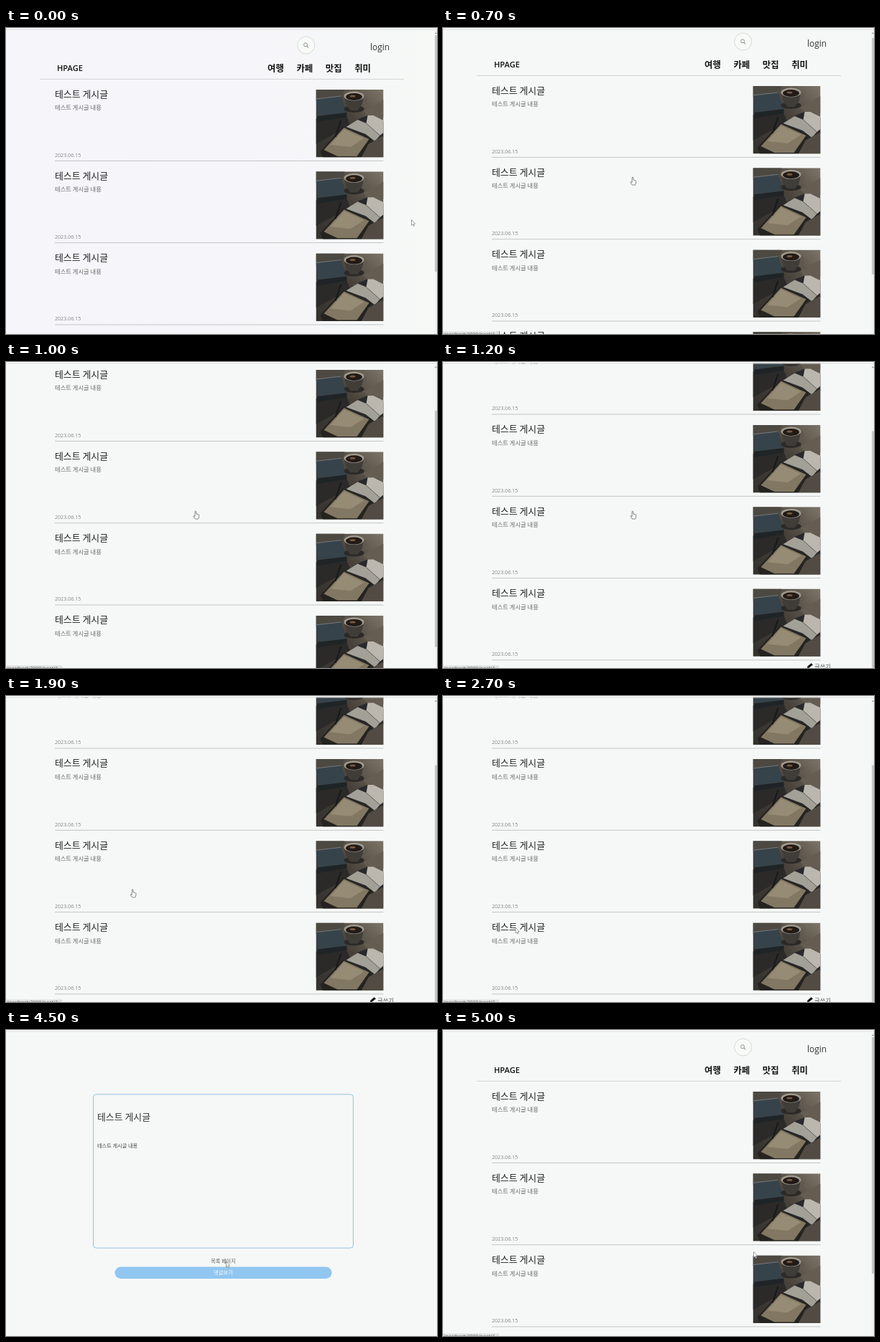
Recreate the animation shown at these times as an HTML page with a canvas. Size 600 by 427 pixels, loop 5100 ms.

```html
<!DOCTYPE html>
<html lang="ko">
<head>
<meta charset="utf-8">
<title>Blog walkthrough</title>
<style>
  html, body { margin: 0; width: 100%; height: 100%; overflow: hidden; background: #f5f8f6; }
  canvas { display: block; width: 600px; height: 427px; }
</style>
</head>
<body>
<canvas id="stage" width="600" height="427"></canvas>
<script>
const W = 600, H = 427, LOOP = 5100, STEP = 100;
const ctx = document.getElementById('stage').getContext('2d');
const KR = '"Noto Sans CJK KR", "Noto Sans CJK", sans-serif';
const LATIN = '"Open Sans", "Noto Sans", sans-serif';

const POSTS = 4, PITCH = 114.3;
const OPEN_AT = 2800, BACK_AT = 4600;

// Each key is [time, value, ...]
const scrollKeys = [[600, 0], [700, 5], [800, 18], [900, 41.5], [1000, 75], [1100, 103], [1200, 112.4]];
const mouseKeys = [
  [0, 564.5, 267.5], [600, 264, 208], [1200, 264, 208], [2500, 101, 323], [2700, 101, 323],
  [3200, 233, 325], [3800, 306.5, 323], [4500, 306.5, 323], [5000, 432.5, 309.5]
];

function track(keys, t) {
  if (t <= keys[0][0]) return keys[0].slice(1);
  for (let i = 1; i < keys.length; i++) {
    const a = keys[i - 1], b = keys[i];
    if (t <= b[0]) {
      const p = (t - a[0]) / (b[0] - a[0]);
      return a.slice(1).map((v, j) => v + (b[j + 1] - v) * p);
    }
  }
  return keys[keys.length - 1].slice(1);
}

function text(str, x, y, size, color, family = KR, weight = 400, align = 'left') {
  ctx.font = `${weight} ${size}px ${family}`;
  ctx.textAlign = align;
  ctx.fillStyle = color;
  ctx.fillText(str, x, y);
}

function rect(x, y, w, h, color) {
  ctx.fillStyle = color;
  ctx.fillRect(x, y, w, h);
}

function poly(points, fill, stroke, width = 1) {
  ctx.beginPath();
  for (let i = 0; i < points.length; i += 2) ctx.lineTo(points[i], points[i + 1]);
  ctx.closePath();
  paint(fill, stroke, width);
}

function ellipse(x, y, rx, ry, fill, stroke, width = 1) {
  ctx.beginPath();
  ctx.ellipse(x, y, rx, ry, 0, 0, Math.PI * 2);
  paint(fill, stroke, width);
}

function roundBox(x, y, w, h, r, fill, stroke, width = 1) {
  ctx.beginPath();
  ctx.roundRect(x, y, w, h, r);
  paint(fill, stroke, width);
}

function paint(fill, stroke, width) {
  if (fill) { ctx.fillStyle = fill; ctx.fill(); }
  if (stroke) { ctx.strokeStyle = stroke; ctx.lineWidth = width; ctx.stroke(); }
}

function line(x1, y1, x2, y2, color, width = 1) {
  ctx.beginPath();
  ctx.moveTo(x1, y1);
  ctx.lineTo(x2, y2);
  paint(null, color, width);
}

// Desk still life in flat shapes
function photo(x, y) {
  ctx.save();
  ctx.translate(x, y);
  ctx.beginPath();
  ctx.rect(0, 0, 94, 94.3);
  ctx.clip();
  const wood = ctx.createLinearGradient(0, 94, 94, 0);
  wood.addColorStop(0, '#34312e');
  wood.addColorStop(0.55, '#47413a');
  wood.addColorStop(1, '#7d7568');
  rect(0, 0, 94, 95, wood);
  poly([0, 0, 40, 0, 36, 10, 0, 13], '#4c4842');
  poly([66, 30, 94, 14, 94, 38, 72, 36], '#655d52');
  poly([0, 40, 42, 36, 48, 50, 18, 66, 0, 76], '#2b2a29');
  poly([0, 13, 35, 9, 43, 32, 2, 37], '#37434a');
  poly([2, 37, 43, 32, 43, 38, 2, 45], '#1f2427');
  line(0, 13, 35, 9, '#77797a');
  ellipse(53, 27, 14, 5, '#2c2a28');
  ellipse(66, 13, 4, 4, null, '#5d5850', 2);
  poly([39, 9, 67, 9, 64, 21, 58, 29, 48, 29, 42, 21], '#403d39');
  ellipse(53, 9, 14, 6.5, '#a19a8d');
  ellipse(53, 10, 11.5, 5, '#211b17');
  ellipse(51, 9, 4, 1.5, '#77593f');
  poly([38, 55, 59, 41, 72, 36, 94, 44, 94, 66, 83, 77, 58, 68], '#28292a');
  poly([42, 52, 58, 42, 70, 47, 89, 64, 82, 72, 69, 62], '#a3a098');
  poly([70, 47, 72, 36, 80, 36, 94, 43, 94, 60, 89, 64], '#bbb7ae');
  line(70, 47, 89, 64, '#66645f');
  poly([6, 86, 38, 51, 78, 69, 63, 95, 10, 95], '#25231f');
  poly([11, 84, 39, 53, 74, 69, 57, 93, 30, 93], '#817762');
  poly([20, 77, 39, 55, 67, 68, 48, 80], '#968b75');
  line(35, 43, 27, 66, '#17191b', 2);
  poly([73, 76, 94, 64, 94, 95, 63, 95], '#514b43');
  ctx.restore();
}

function post(y) {
  text('테스트 게시글', 68, y + 96.5, 12.9, '#222');
  text('테스트 게시글 내용', 68, y + 114, 8.3, '#686868');
  text('2023.06.15', 68, y + 179.8, 7.1, '#858585', LATIN);
  photo(431.5, y + 86);
  line(68, y + 185.4, 525.5, y + 185.4, '#c3c5c4');
}

function header() {
  ellipse(417.7, 24, 12, 12, '#f8faf8', '#d3dad5');
  ellipse(417, 23.3, 2.5, 2.5, null, '#8d9391');
  line(418.9, 25.2, 421, 27.3, '#8d9391', 1.2);
  text('login', 507, 31, 11.9, '#333', LATIN);
  text('HPAGE', 71, 60.3, 11.1, '#111', LATIN, 600);
  ['여행', '카페', '맛집', '취미'].forEach((name, i) =>
    text(name, 364 + i * 40.4, 60.5, 12.4, '#111', KR, 700));
  line(47, 71.4, 554, 71.4, '#d2d5d3');
}

function writeLink() {
  poly([507, 539.5, 507.6, 537, 512.6, 532.6, 515, 534.8, 509.8, 539], '#111');
  text('글쓰기', 517, 540.3, 8.3, '#555');
}

function scrollbar(scroll) {
  rect(596.5, 3, 3.5, H - 3, '#f0f1f1');
  poly([597, 8, 599.6, 8, 598.3, 6], '#8a8a8a');
  rect(597, 10 + scroll * 0.77, 3, 330, '#c5c7c6');
}

function statusBar() {
  ctx.save();
  ctx.beginPath();
  ctx.rect(0, 423.5, 78, 4);
  ctx.clip();
  rect(0, 423, 78, 5, '#dfe2e1');
  text('localhost:3000/post/1', 2, 430, 7, '#666', LATIN);
  ctx.restore();
}

function listPage(t, scroll) {
  ctx.save();
  ctx.translate(0, -scroll);
  header();
  for (let i = 0; i < POSTS; i++) post(i * PITCH);
  writeLink();
  ctx.restore();
  scrollbar(scroll);
  if (t >= 700) statusBar();
}

function detailPage() {
  roundBox(121.6, 89.8, 361.8, 214.4, 4, null, '#94c1e2');
  text('테스트 게시글', 127, 126, 12.9, '#333');
  text('테스트 게시글 내용', 127, 163.5, 7.2, '#444');
  text('목록 페이지', 302.5, 324.8, 7.2, '#606060', KR, 400, 'center');
  roundBox(151.5, 330.5, 302, 16.5, 8.25, '#90c6f0');
  text('댓글보기', 302.5, 341.4, 7.3, '#fff', KR, 400, 'center');
}

function arrow(x, y) {
  poly([x, y, x, y + 8, x + 1.8, y + 6.4, x + 3, y + 9, x + 4.1, y + 8.5,
    x + 3, y + 6, x + 5.2, y + 5.7], '#fff', '#777', 0.7);
}

function hand(x, y) {
  poly([x - 0.8, y + 0.5, x, y, x + 0.8, y + 0.5, x + 1, y + 4, x + 4.2, y + 5, x + 4.9, y + 6,
    x + 4.4, y + 9, x + 3.6, y + 11, x - 0.6, y + 11, x - 3, y + 7.4, x - 2.4, y + 6.5,
    x - 0.9, y + 7.6], '#fff', '#666', 0.8);
}

function background(t) {
  if (t >= 700) return rect(0, 0, W, H, '#f5f8f6');
  const tint = ctx.createLinearGradient(0, 0, W, 0);
  tint.addColorStop(0, '#f6f5f9');
  tint.addColorStop(0.7, '#f6f6f9');
  tint.addColorStop(1, '#f6f9f6');
  rect(0, 0, W, H, tint);
}

function draw(t) {
  const onDetail = t >= OPEN_AT && t < BACK_AT;
  const [x, y] = track(mouseKeys, t);
  background(t);
  if (onDetail) detailPage();
  else listPage(t, t < OPEN_AT ? track(scrollKeys, t)[0] : 0);
  rect(0, 0, W, 1.5, '#fcfcfc');
  rect(0, 1.5, W, 1, '#dddfde');
  const overPost = t < 2700 && x > 68 && x < 526;
  (overPost ? hand : arrow)(x, y);
}

function tick() {
  const t = performance.now() % LOOP;
  draw(Math.floor(t / STEP) * STEP);
  requestAnimationFrame(tick);
}
tick();
</script>
</body>
</html>
```
